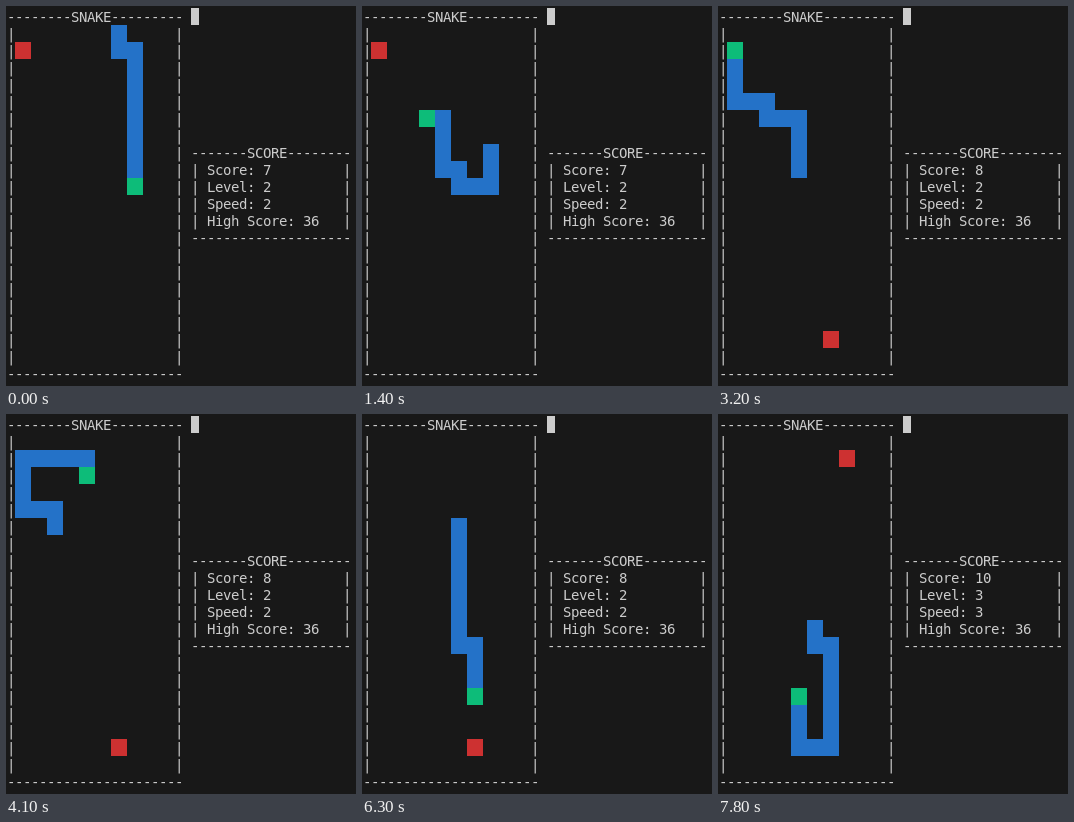
An HTML page with a canvas that plays this animation: 350 by 380 pixels, repeating every 8000 ms.

```html
<!DOCTYPE html>
<html lang="en">
<head>
<meta charset="utf-8">
<title>Snake</title>
<style>
  html, body { margin: 0; width: 100%; height: 100%; overflow: hidden; background: #181818; }
  canvas { display: block; }
</style>
</head>
<body>
<canvas id="screen" width="350" height="380"></canvas>
<script>
const ctx = document.getElementById('screen').getContext('2d');
const LOOP = 8000;
const CELL_W = 8, CELL_H = 17, LEFT = 1, TOP = 2;
const COLORS = { back: '#181818', text: '#cccccc', body: '#2472c8', head: '#0dbc79', food: '#cd3131' };

// The route starts at the tail; the head begins START_LENGTH - 1 squares further on.
const ROUTE = 'D R D8 L2 U L U3 L2 U L2 U3 R4 D R D10 R D6 L2 U3';
const START_LENGTH = 11;
const STEPS = { U: [0, -1], D: [0, 1], L: [-1, 0], R: [1, 0] };

const path = [[6, 0]];
for (const [dir, ...count] of ROUTE.split(' ')) {
  const [dx, dy] = STEPS[dir];
  for (let n = Number(count.join('')) || 1; n > 0; n--) {
    const [x, y] = path[path.length - 1];
    path.push([x + dx, y + dy]);
  }
}

// Time of each move in units of 100 ms; a repeated time is a double move.
const MOVE_TIMES = [
  1, 3, 5, 6, 8, 11, 14, 14,
  16, 17, 19, 25, 25, 27, 32,
  34, 36, 38, 39, 41,
  45, 46, 53, 53,
  54, 56, 56, 57, 57, 59, 59, 60, 62, 62, 63,
  64, 66, 67, 69,
  72, 74, 76, 78
];
const MEALS = [15, 38, 42]; // move numbers that reach the food
const LAST_FOOD = [7, 1];

function write(col, row, text) {
  ctx.fillStyle = COLORS.text;
  [...text].forEach((char, i) =>
    ctx.fillText(char, LEFT + (col + i) * CELL_W, TOP + (row + 1) * CELL_H));
}

function fillCells(col, row, width, color) {
  ctx.fillStyle = color;
  ctx.fillRect(LEFT + col * CELL_W, TOP + row * CELL_H, width * CELL_W, CELL_H);
}

// Each board square is two terminal cells wide, inside the border.
function square([x, y], color) {
  fillCells(1 + 2 * x, 1 + y, 2, color);
}

function drawBoard() {
  write(0, 0, '-'.repeat(8) + 'SNAKE' + '-'.repeat(9));
  for (let row = 1; row <= 20; row++) {
    write(0, row, '|');
    write(21, row, '|');
  }
  write(0, 21, '-'.repeat(22));
  fillCells(23, 0, 1, COLORS.text);
}

function drawScore(score) {
  const level = score < 10 ? 2 : 3;
  const lines = [`Score: ${score}`, `Level: ${level}`, `Speed: ${level}`, 'High Score: 36'];
  write(23, 8, '-'.repeat(7) + 'SCORE' + '-'.repeat(8));
  lines.forEach((line, i) => write(23, 9 + i, `| ${line.padEnd(17)}|`));
  write(23, 13, '-'.repeat(20));
}

function draw(time) {
  const moves = MOVE_TIMES.filter(t => t * 100 <= time).length;
  const eaten = MEALS.filter(move => move <= moves).length;
  const head = START_LENGTH - 1 + moves;
  const food = eaten < MEALS.length ? path[START_LENGTH - 1 + MEALS[eaten]] : LAST_FOOD;

  ctx.fillStyle = COLORS.back;
  ctx.fillRect(0, 0, 350, 380);
  ctx.font = '14px "DejaVu Sans Mono", monospace';
  ctx.textBaseline = 'ideographic';
  drawBoard();
  drawScore(7 + eaten);
  square(food, COLORS.food);
  path.slice(moves - eaten, head).forEach(cell => square(cell, COLORS.body));
  square(path[head], COLORS.head);
}

const start = performance.now();
function tick() {
  draw((performance.now() - start) % LOOP);
  requestAnimationFrame(tick);
}
tick();
</script>
</body>
</html>
```
